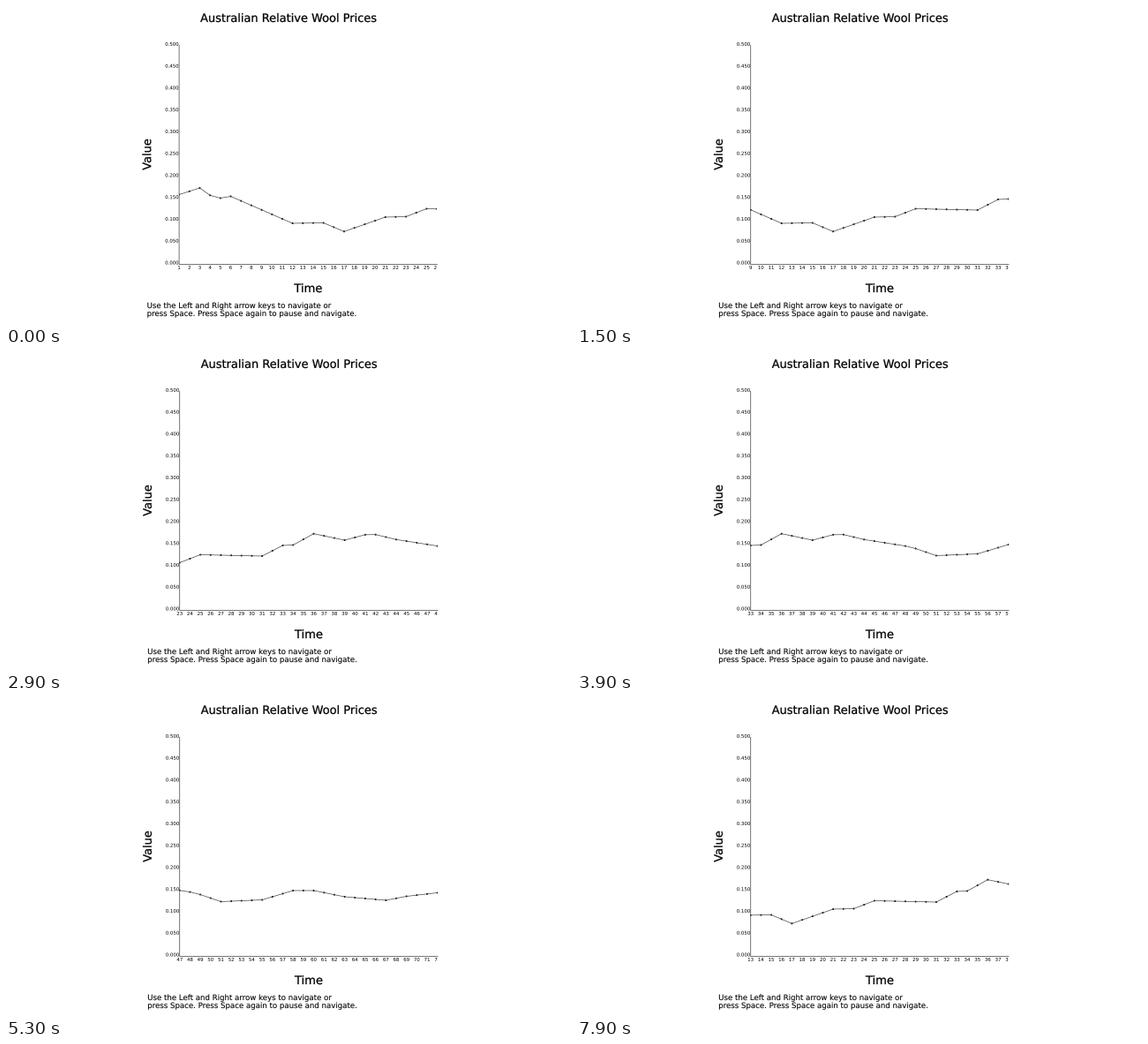
These frames come from a looping animation (640 px wide and 360 px high, 8000 ms). A matplotlib script:

```python
import numpy as np
import matplotlib.pyplot as plt
from matplotlib.animation import FuncAnimation
from matplotlib.patches import PathPatch, Rectangle
from matplotlib.path import Path
from matplotlib.textpath import TextPath
from matplotlib.transforms import Affine2D

W, H, DPI = 640, 360, 80
PX = 72 / DPI                 # one pixel in points
FRAMES, INTERVAL = 80, 100
LEFT, RIGHT, TOP, BOTTOM = 196.1, 488.4, 44.5, 292.5
STEP = 11.68                  # pixels between two time marks
NUDGE = 0.6                   # the page settles sideways after the first frame

# Turning points of the curve: time mark -> height on the stage
TURNS = {1: 213.5, 3: 206, 4.5: 218.5, 6: 215.5, 12: 246, 15: 245.5, 17: 255.3,
         21: 239, 23: 238.5, 25: 229.5, 31: 231, 33: 219, 34: 218.5, 36: 205.7,
         39: 213, 41.5: 205.3, 44: 212.3, 48.5: 220.5, 51: 230.5, 55: 228.5,
         58: 218, 60: 218, 63: 225, 67: 229, 69: 224.5, 72: 220.5, 77: 226}
TIMES = np.arange(1, 78)
XS = LEFT + (TIMES - 1) * STEP
YS = np.interp(TIMES, list(TURNS), list(TURNS.values()))

fig = plt.figure(figsize=(W / DPI, H / DPI), dpi=DPI, facecolor="white")
ax = fig.add_axes([0, 0, 1, 1])
ax.set_xlim(0, W)
ax.set_ylim(H, 0)
ax.axis("off")

page, scroll = Affine2D(), Affine2D()
on_page = page + ax.transData
on_strip = scroll + page + ax.transData


def glyphs(text, x, y, size, align="left", angle=0):
    """Outline of text with its baseline at (x, y), y pointing down."""
    path = TextPath((0, 0), text, size=size, prop={"family": "DejaVu Sans"})
    box = path.get_extents()
    shift = {"left": 0, "center": -(box.x0 + box.x1) / 2, "right": -box.x1}[align]
    place = Affine2D().translate(shift, 0).scale(1, -1).rotate_deg(angle).translate(x, y)
    return place.transform_path(path)


def circle(x, y, r):
    return Path.unit_circle().transformed(Affine2D().scale(r).translate(x, y))


def add_shapes(paths, transform, weight=0):
    patch = PathPatch(Path.make_compound_path(*paths), fc="black", ec="black",
                      lw=weight * PX, snap=False, transform=transform)
    return ax.add_patch(patch)


def add_line(xs, ys, color, width, transform):
    line, = ax.plot(xs, ys, color=color, lw=width * PX, snap=False, transform=transform)
    return line


def clip(artist, x0):
    artist.set_clip_path(Rectangle((x0, 0), RIGHT - x0, H, transform=on_page))


# Fixed parts
add_shapes([
    glyphs("Australian Relative Wool Prices", 319.8, 18, 12.95, "center"),
    glyphs("Time", 342, 324, 13.1, "center"),
    glyphs("Value", 164.2, 168.3, 12.95, "center", -90),
], on_page, 0.25)
add_shapes([
    glyphs("Use the Left and Right arrow keys to navigate or", 159.6, 342, 8.6),
    glyphs("press Space. Press Space again to pause and navigate.", 159.6, 351, 8.6),
], on_page, 0.1)
add_shapes([glyphs(f"{0.5 - 0.05 * k:.3f}", 195.3, 45 + 24.75 * k, 5.4, "right")
            for k in range(11)], on_page)
add_line([LEFT, LEFT, RIGHT], [TOP, BOTTOM, BOTTOM], "#555555", 0.8, on_page)

# Scrolling strip
curve = add_line(XS, YS, "#444444", 0.7, on_strip)
dots = add_shapes([circle(x, y, 1) for x, y in zip(XS, YS)], on_strip)
marks = add_shapes([glyphs(str(t), x, 297.9, 5.4, "center")
                    for t, x in zip(TIMES, XS)], on_strip)
clip(curve, LEFT - 0.3)
clip(dots, LEFT - 0.3)
clip(marks, LEFT - 6.3)


def first_time(n):
    """Time mark at the left edge: steady run, pause, one step back, fast rewind."""
    if n < 62:
        return min(max(1, n - 6), 52)
    if n < 68:
        return 51
    return round(48 - (n - 68) * 35 / 11)


def draw(n):
    page.clear().translate(NUDGE if n else 0, 0)
    scroll.clear().translate(-(first_time(n) - 1) * STEP, 0)
    return curve, dots, marks


anim = FuncAnimation(fig, draw, frames=FRAMES, interval=INTERVAL,
                     repeat=True, repeat_delay=0, blit=False)
plt.show()
```
